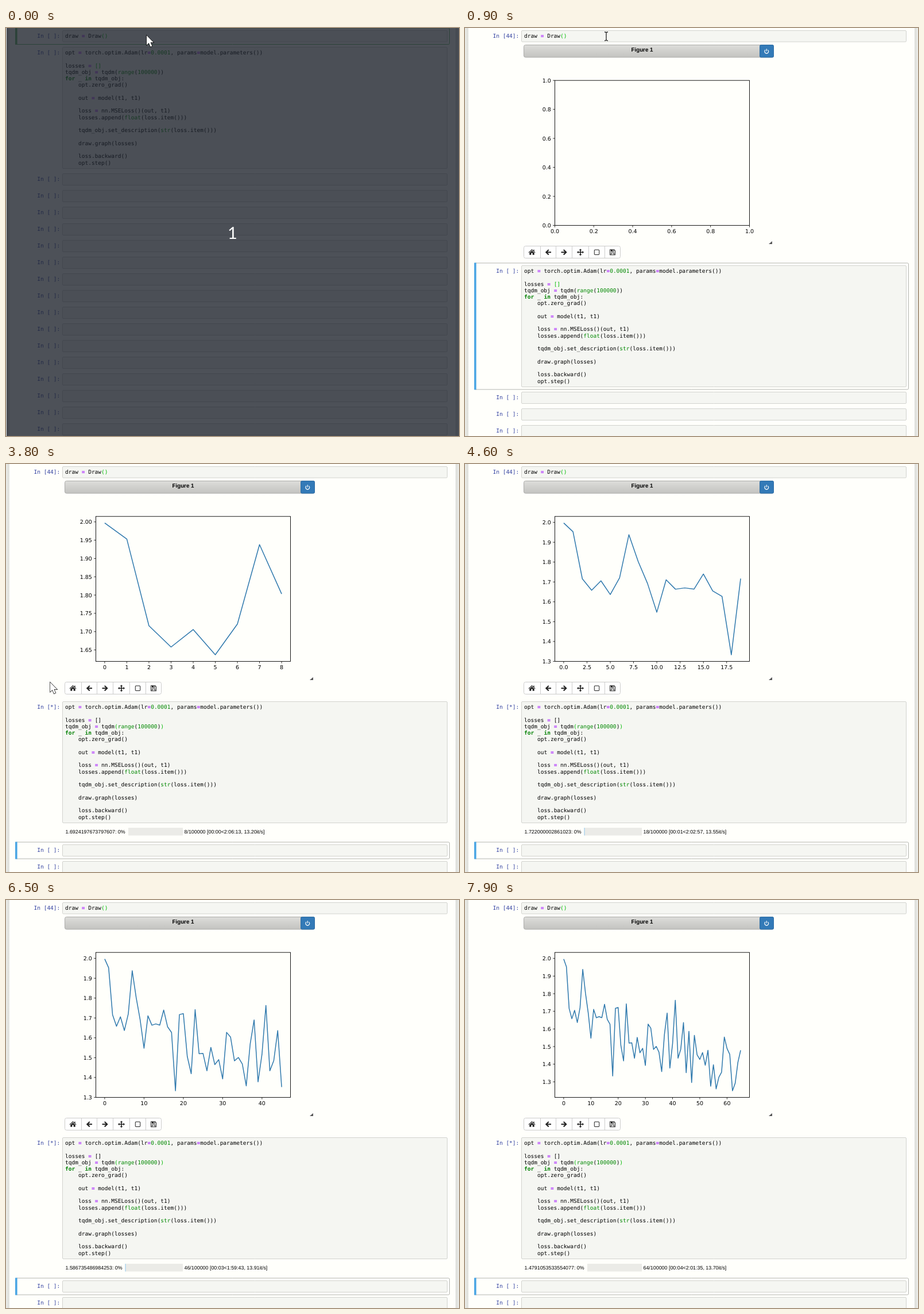
Recreate the animation shown at these times as an HTML page with a canvas. Size 789 px wide and 710 px high, loop 8 s.

```html
<!DOCTYPE html>
<html lang="en">
<head>
<meta charset="utf-8">
<title>Notebook training loop</title>
<style>
  html, body { margin: 0; width: 100%; height: 100%; overflow: hidden; }
  canvas { display: block; }
</style>
</head>
<body>
<canvas id="stage" width="789" height="710"></canvas>
<script>
const ctx = document.getElementById('stage').getContext('2d');
ctx.textRendering = 'geometricPrecision';

const LOOP = 8000;
const PAGE = '#fffffb', INK = '#000', GREEN = '#66bb6a', BLUE = '#4ba6e4';
const MONO = '9.53px "DejaVu Sans Mono", monospace';
const PLOT_FONT = '9.5px "DejaVu Sans", sans-serif';
const UI_FONT = '8.9px "Liberation Sans", Arial, sans-serif';
const CHAR = 5.737, LINE = 11.27, PITCH = 28.97, FIGURE_HEIGHT = 380;
const AXES = { x: 156.5, y: 91.2, w: 339, h: 252.3 };

const CODE = `opt = torch.optim.Adam(lr=0.0001, params=model.parameters())

losses = []
tqdm_obj = tqdm(range(100000))
for _ in tqdm_obj:
    opt.zero_grad()

    out = model(t1, t1)

    loss = nn.MSELoss()(out, t1)
    losses.append(float(loss.item()))

    tqdm_obj.set_description(str(loss.item()))

    draw.graph(losses)

    loss.backward()
    opt.step()`.split('\n');

// Training losses, in thousandths
const LOSSES = [
  1997, 1953, 1716, 1658, 1705.7, 1636.7, 1720.7, 1938, 1803, 1692.4198, 1547.6,
  1711, 1663.5, 1670, 1664, 1740, 1655, 1627, 1333, 1717, 1722, 1506, 1419, 1742,
  1520, 1521.5, 1434, 1552, 1465, 1490, 1393, 1627.3232, 1604, 1484, 1501, 1468,
  1358, 1569, 1690, 1378, 1517, 1763, 1434, 1485, 1636, 1352, 1586.7355, 1296,
  1564, 1453, 1427, 1466, 1394, 1479, 1275, 1397, 1260, 1326, 1355, 1554, 1489,
  1456, 1249, 1292, 1411, 1479.1054
].map(v => Math.fround(v / 1000));
const RATES = [[0, 12.9], [8, 13.2029], [30, 13.97], [46, 13.914], [64, 13.699]];
const HELD = [3400, 4400, 4900, 5300, 6100, 6300, 6600, 7200];

const mix = (a, b, k) => a + (b - a) * k;

function text(str, x, y, font, color = INK, align = 'left') {
  ctx.font = font;
  ctx.fillStyle = color;
  ctx.textAlign = align;
  ctx.fillText(str, x, y);
}

function rect(x, y, w, h, color) {
  ctx.fillStyle = color;
  ctx.fillRect(x, y, w, h);
}

function panel(x, y, w, h, r, fill, border) {
  ctx.beginPath();
  ctx.roundRect(x + .5, y + .5, w - 1, h - 1, r);
  ctx.fillStyle = fill;
  ctx.fill();
  ctx.strokeStyle = border;
  ctx.lineWidth = 1;
  ctx.stroke();
}

function stroke(points, color, width) {
  ctx.beginPath();
  points.forEach(([x, y]) => ctx.lineTo(x, y));
  ctx.strokeStyle = color;
  ctx.lineWidth = width;
  ctx.stroke();
}

function shape(x, y, path, fill, outline) {
  const p = new Path2D(path);
  ctx.save();
  ctx.translate(x, y);
  if (outline) {
    ctx.strokeStyle = outline;
    ctx.lineWidth = 1.3;
    ctx.stroke(p);
  }
  if (fill) {
    ctx.fillStyle = fill;
    ctx.fill(p, 'evenodd');
  }
  ctx.restore();
}

// ---- Notebook cells ----

function codeLine(line, x, y, matched = []) {
  const tokens = /\b(?:for|in)\b|\b(?:range|float|str)\b|\b\d[\d.]*|=|[()[\]]|[^\s()[\]=]+?(?=\b|[\s()[\]=])|\S/g;
  for (const { 0: token, index } of line.matchAll(tokens)) {
    let color = INK, weight = '';
    if (token === '=') { color = '#aa22ff'; weight = 'bold '; }
    else if (/^(for|in)$/.test(token)) { color = '#008000'; weight = 'bold '; }
    else if (/^(range|float|str)$/.test(token) || /^\d/.test(token)) color = '#008800';
    else if (matched.includes(index)) color = '#00bb00';
    text(token, x + index * CHAR, y, weight + MONO, color);
  }
}

function cell(y, h, label, mode, lines = [], matches = {}) {
  if (mode) {
    const color = mode === 'edit' ? GREEN : BLUE;
    panel(16, y - 4.5, 757, h + 9, 2, PAGE, mode === 'edit' ? GREEN : '#b4b5b2');
    rect(16, y - 4.5, 3.6, h + 9, color);
  }
  panel(98, y, 671, h, 1.5, '#f5f6f2', '#d2d3cf');
  text(`In [${label}]:`, 94.3, y + 13, MONO, '#303f9f', 'right');
  lines.forEach((line, i) => codeLine(line, 103, y + 13 + i * LINE, matches[i]));
}

function caret(x, y) {
  rect(x, y, 1.4, 11, INK);
}

// ---- Figure ----

function ticks(low, high) {
  const raw = (high - low) / 9, power = 10 ** Math.floor(Math.log10(raw));
  const step = power * [1, 2, 2.5, 5, 10].find(s => s * power >= raw - 1e-9);
  let digits = 0;
  while (Math.abs(step * 10 ** digits - Math.round(step * 10 ** digits)) > 1e-6) digits++;
  const list = [];
  for (let k = Math.ceil(low / step - 1e-6); k * step <= high + 1e-9; k++)
    list.push([k * step, (k * step).toFixed(digits)]);
  return list;
}

function plot(last) {
  let [x0, x1, y0, y1] = [0, 1, 0, 1];
  const data = LOSSES.slice(0, last + 1);
  if (last > 0) {
    const low = Math.min(...data), high = Math.max(...data), pad = (high - low) * .05;
    [x0, x1, y0, y1] = [-last * .05, last * 1.05, low - pad, high + pad];
  }
  const px = v => AXES.x + (v - x0) / (x1 - x0) * AXES.w;
  const py = v => AXES.y + (y1 - v) / (y1 - y0) * AXES.h;
  const bottom = AXES.y + AXES.h;
  for (const [v, label] of ticks(x0, x1)) {
    stroke([[px(v), bottom], [px(v), bottom + 3.3]], INK, .8);
    text(label, px(v), 357.2, PLOT_FONT, INK, 'center');
  }
  for (const [v, label] of ticks(y0, y1)) {
    stroke([[AXES.x - 3.3, py(v)], [AXES.x, py(v)]], INK, .8);
    text(label, 149.8, py(v) + 3.5, PLOT_FONT, INK, 'right');
  }
  ctx.lineJoin = 'round';
  if (last > 0) stroke(data.map((v, i) => [px(i), py(v)]), '#2f79ad', 1.5);
  ctx.lineJoin = 'miter';
  ctx.strokeStyle = INK;
  ctx.lineWidth = .9;
  ctx.strokeRect(AXES.x, AXES.y, AXES.w, AXES.h);
}

const ICONS = [
  [116.5, 'M0-5.2L6 .2 5.2 1 0-3.6-5.2 1-6 .2-2.2-3.2ZM2.6-4.5H4.2V-1L2.6-2.4ZM0-2.6L4.2 1V4.6H1.2V1.4H-1.2V4.6H-4.2V1Z'],
  [145, 'M-5.2 0L0-5 1.5-3.6-1.2-1H5V1H-1.2L1.5 3.6 0 5Z'],
  [172.5, 'M5.2 0L0-5-1.5-3.6 1.2-1H-5V1H1.2L-1.5 3.6 0 5Z'],
  [201, 'M0-6L2.4-3.5H.8V-.8H3.5V-2.4L6 0 3.5 2.4V.8H.8V3.5H2.4L0 6-2.4 3.5H-.8V.8H-3.5V2.4L-6 0-3.5-2.4V-.8H-.8V-3.5H-2.4Z'],
  [229.5, 'M-3-4.7H3Q4.7-4.7 4.7-3V3Q4.7 4.7 3 4.7H-3Q-4.7 4.7-4.7 3V-3Q-4.7-4.7-3-4.7ZM-3-3.7Q-3.7-3.7-3.7-3V3Q-3.7 3.7-3 3.7H3Q3.7 3.7 3.7 3V-3Q3.7-3.7 3-3.7Z'],
  [257, 'M-5-5H3L5-3V5H-5ZM-4-4V4H-3V.6H3V4H4V-2.6L2.6-4V-1H-3V-4ZM-2 1.6V4H2V1.6ZM0-4V-2H1.5V-4Z']
];

function figure(last, ready) {
  const shade = ctx.createLinearGradient(0, 29, 0, 51);
  shade.addColorStop(0, '#dededb');
  shade.addColorStop(.5, '#d0d0cd');
  shade.addColorStop(1, '#c3c3c0');
  panel(102, 29, 436, 22.5, 3, shade, '#acacaa');
  text('Figure 1', 308.5, 41, 'bold 9.8px "Liberation Sans", Arial, sans-serif', INK, 'center');
  panel(513, 29, 25, 22.5, 2, '#337ab7', '#2e6da4');
  ctx.beginPath();
  ctx.arc(525.3, 40.8, 3.4, -.9, Math.PI + .9);
  ctx.strokeStyle = '#fff';
  ctx.lineWidth = 1.2;
  ctx.stroke();
  stroke([[525.3, 36.2], [525.3, 40.6]], '#fff', 1.2);

  if (ready) plot(last);
  shape(535, 376, 'M0-5V0H-6Z', '#555');

  panel(102, 379, 169, 22, 3, '#fff', '#ccc');
  for (const x of [131, 158, 186, 215, 243]) rect(x, 380, 1, 20, '#ccc');
  for (const [x, path] of ICONS) shape(x, 390.2, path, '#222');
}

// ---- Progress line ----

function rateAt(count) {
  const i = Math.max(1, RATES.findIndex(([n]) => n >= count));
  const [[n0, r0], [n1, r1]] = [RATES[i - 1], RATES[i]];
  return mix(r0, r1, (count - n0) / (n1 - n0));
}

function progress(steps, last) {
  const count = Math.max(0, 2 * Math.floor((steps + .5) / 2));
  const label = LOSSES[Math.min(last + 1, LOSSES.length - 1)] + ': 0%';
  text(label, 103.5, 642.5, UI_FONT);
  const left = Math.round(103.5 + ctx.measureText(label).width + 4.9);
  rect(left, 633, 308 - left, 13.5, '#ebebe7');
  if (left < 211) rect(left - .5, 633, 1, 13.5, '#8fc7ee');

  const two = n => String(Math.floor(n)).padStart(2, '0');
  let timing = '00:00<?, ?it/s';
  if (count) {
    const rate = rateAt(count), rest = (100000 - count) / rate;
    timing = `00:${two(count / 13.9)}<${Math.floor(rest / 3600)}:${two(rest / 60 % 60)}:${two(rest % 60)}, ${rate.toFixed(2)}it/s`;
  }
  text(`${count}/100000 [${timing}]`, 310.5, 642.5, UI_FONT);
}

// ---- Pointer ----

function arrow(x, y) {
  shape(x, y, 'M0 0V16.5L3.8 13 6.6 19.6 9.4 18.4 6.6 12H11.8Z', '#fff', INK);
}

function beam(x, y) {
  shape(x, y, 'M-3-7.5Q0-7.5 0-6V6Q0 7.5-3 7.5M3-7.5Q0-7.5 0-6M0 6Q0 7.5 3 7.5', null, '#222');
}

function pointer(tick) {
  if (tick < 200) arrow(245, 13);
  else if (tick < 2200) beam(246, 14.5);
  else if (tick < 2500) {
    const k = (tick - 2200) / 300;
    arrow(mix(248, 283, k), mix(47, 457, k));
  } else if (tick < 3200) beam(283, 457);
  else if (tick < 4200) {
    const k = Math.min(1, (tick - 3100) / 400);
    arrow(mix(283, 77, k), mix(457, 380, k));
  }
}

// ---- Scene ----

function page() {
  rect(0, 0, 789, 710, PAGE);
  for (const [x, inner] of [[0, 6], [789, 783]]) {
    const shade = ctx.createLinearGradient(x, 0, inner, 0);
    shade.addColorStop(0, '#ebece8');
    shade.addColorStop(1, '#dcddd9');
    rect(Math.min(x, inner), 0, 5.8, 710, shade);
  }
}

function countdown() {
  rect(1, 0, 788, 710, 'rgba(29, 34, 44, .785)');
  text('1', 394.5, 367, '29px Lato, sans-serif', '#fff', 'center');
}

function draw(t) {
  const tick = Math.floor(t / 100) * 100;
  const shown = HELD.includes(tick) ? tick - 100 : tick;
  const steps = 8.05 + (shown - 3800) * .0139, last = Math.floor(steps);
  const hasFigure = tick >= 800, clicked = tick >= 2600;
  const running = tick >= 3000, hasOutput = tick >= 3200;
  const shift = hasFigure ? FIGURE_HEIGHT : 0;

  page();
  const firstLabel = tick < 700 ? ' ' : hasFigure ? '44' : '*';
  cell(4, 20.5, firstLabel, tick < 700 && 'edit', ['draw = Draw()'], { 0: [11, 12] });
  if (tick >= 200 && tick < 700) caret(177.3, 9);
  if (hasFigure) figure(last, tick >= 900);

  const mode = tick >= 700 && !running && (clicked ? 'edit' : 'command');
  cell(33 + shift, 212, running ? '*' : ' ', mode, CODE, clicked ? { 3: [15, 29] } : { 2: [9, 10] });
  if (clicked && !running) caret(275, 451);
  if (hasOutput) progress(steps, last);

  let y = 253 + shift + (hasOutput ? PITCH : 0);
  for (let first = true; y < 710; y += PITCH, first = false)
    cell(Math.round(y), 21, ' ', running && first && 'command');

  if (tick < 200) countdown();
  pointer(tick);
}

function frame() {
  draw(performance.now() % LOOP);
  requestAnimationFrame(frame);
}
frame();
</script>
</body>
</html>
```
